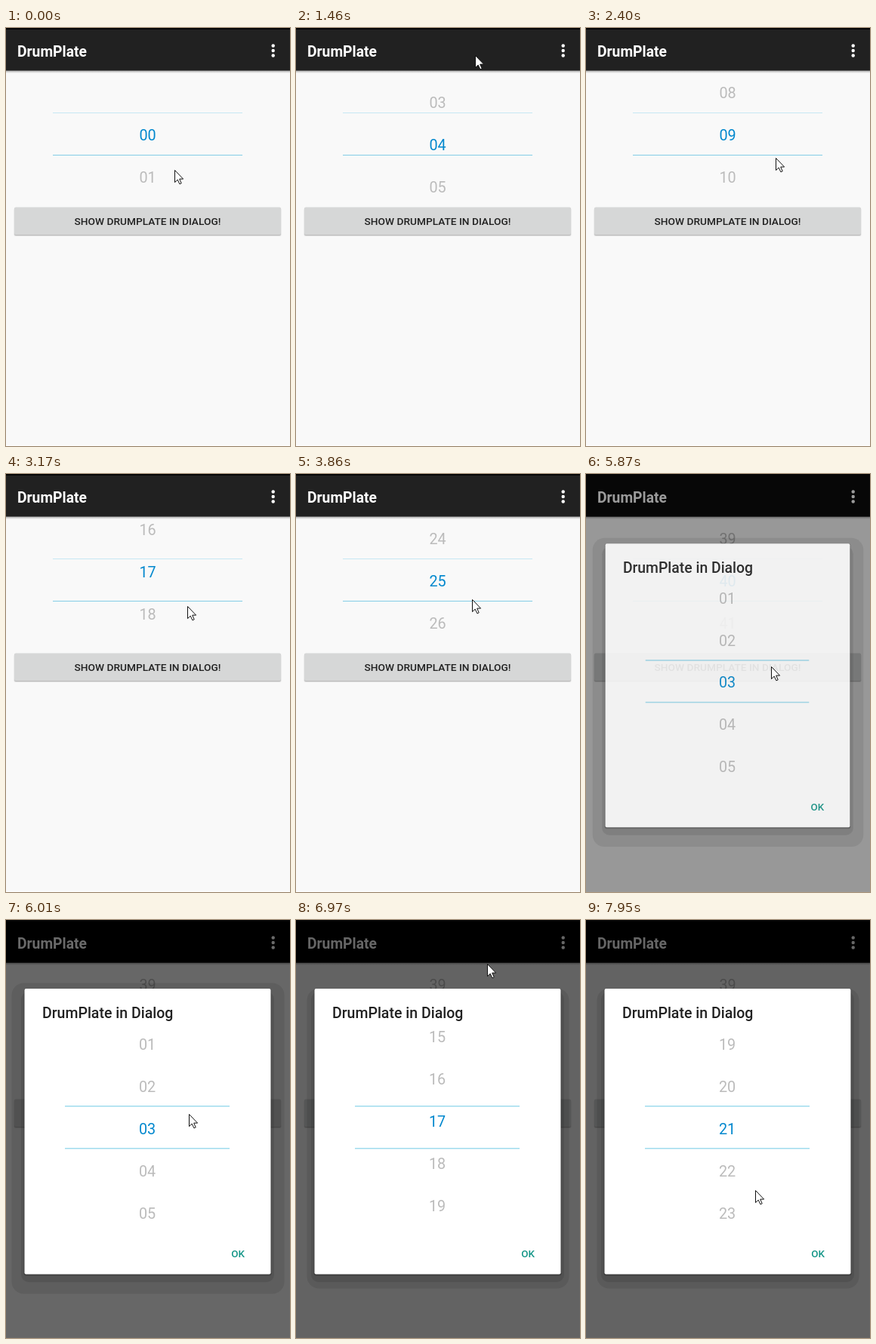
An HTML page that plays this animation: 376 by 554 pixels, repeating every 8 s.

```html
<!DOCTYPE html>
<html lang="en">
<head>
<meta charset="utf-8">
<title>DrumPlate</title>
<style>
  html, body { margin: 0; width: 100%; height: 100%; overflow: hidden; background: #f9f9f9; }
  svg { display: block; width: 376px; height: 554px; font-family: Roboto, sans-serif; }
  .medium { font-weight: 500; }
  .wheel { font-size: 19.8px; text-anchor: middle; }
</style>
</head>
<body>
<svg viewBox="0 0 376 554" xmlns="http://www.w3.org/2000/svg">
  <defs>
    <linearGradient id="drop" x1="0" y1="0" x2="0" y2="1">
      <stop offset="0" stop-opacity=".34"/>
      <stop offset="1" stop-opacity="0"/>
    </linearGradient>
    <clipPath id="pageClip"><rect x="62" y="57" width="251" height="168"/></clipPath>
    <clipPath id="dialogClip"><rect x="78" y="136" width="218" height="278"/></clipPath>
  </defs>

  <rect width="376" height="554" fill="#f9f9f9"/>
  <rect y="553" width="376" height="1" fill="#fff"/>
  <rect y="56" width="376" height="4" fill="url(#drop)"/>
  <rect width="376" height="56.5" fill="#212121"/>
  <rect width="376" height="2" fill="#060606"/>
  <rect id="barDim" y="2" width="376" height="54.5" opacity="0"/>
  <text x="15" y="37.5" font-size="19.3" font-weight="700" fill="#fff">DrumPlate</text>
  <g fill="#fff">
    <circle cx="353.7" cy="23.5" r="2.2"/>
    <circle cx="353.7" cy="30" r="2.2"/>
    <circle cx="353.7" cy="36.5" r="2.2"/>
  </g>

  <rect x="62" y="112" width="251" height="1" fill="#c6e8f3"/>
  <rect x="62" y="168" width="251" height="1" fill="#83cde6"/>
  <g id="pageWheel" class="wheel" clip-path="url(#pageClip)"></g>

  <rect x="10.5" y="238.5" width="354" height="37.5" rx="2.5" opacity=".1"/>
  <rect x="11" y="238" width="353" height="37" rx="2" opacity=".16"/>
  <rect x="11" y="237.5" width="353" height="36.5" rx="2" fill="#d6d7d7"/>
  <text class="medium" x="187.5" y="261" font-size="13.7" text-anchor="middle" fill="#212121">SHOW DRUMPLATE IN DIALOG!</text>

  <rect id="dim" y="2" width="376" height="552" opacity="0"/>
  <g id="dialog" opacity="0">
    <rect id="shade" opacity=".09"/>
    <rect x="20" y="95" width="335" height="385" rx="10" opacity=".1"/>
    <rect x="23.5" y="91" width="328" height="380.5" rx="3" opacity=".22"/>
    <rect x="24.5" y="91" width="326" height="378.5" rx="2" fill="#fff"/>
    <text class="medium" x="48" y="130" font-size="19.5" fill="#212121">DrumPlate in Dialog</text>
    <rect x="78" y="246" width="218" height="1.5" fill="#9fdcee"/>
    <rect x="78" y="302" width="218" height="1.5" fill="#9fdcee"/>
    <g id="dialogWheel" class="wheel" clip-path="url(#dialogClip)"></g>
    <text class="medium" x="298.2" y="447" font-size="13.4" fill="#159688">OK</text>
  </g>

  <path id="cursor" d="M.5 .5V16.6L4.2 13.1L6.9 18.8L9.2 17.8L6.7 12.1H11.6Z"
        fill="#fff" stroke="#111" stroke-linejoin="round"/>
</svg>
<script>
const LOOP = 8000, ROW = 56, OPEN = 5740, READY = 6020;
const RISE = 0.38;  // share of a flick spent dragging upwards
const SWAY = 16;    // how far a drag leans to the right

const $ = id => document.getElementById(id);
const clamp = v => Math.max(0, Math.min(1, v));
const mix = (a, b, u) => a + (b - a) * u;
const smooth = u => (1 - Math.cos(Math.PI * u)) / 2;
const spin = u => 1 - Math.pow(1 - Math.pow(u, 1.6), 4.08);

// Time, wheel value, pointer x and y; a fifth number is the top of a flick that starts here.
const steps = [
  [800, 0, 223, 188], [930, 0, 205, 195],
  [1110, 0, 205, 195, 0], [2400, 9, 251, 172],
  [2440, 9, 251, 172, 0], [3140, 17, 240, 180, 20], [3840, 25, 233, 166],
  [3880, 25, 233, 166, 46], [4400, 32, 240, 185, 33], [4780, 40.125, 340, 150],
  [4960, 40.125, 280, 196], [5140, 40, 258, 241], [5440, 40, 248, 254],
  [OPEN, 40, 248, 254], [READY, 3, 242, 257, 130],
  [6500, 13, 250, 275, 46], [7950, 21, 224, 358]
];

function stateAt(t) {
  const i = Math.max(0, steps.findLastIndex(s => s[0] <= t));
  const [t0, v0, x0, y0, top] = steps[i];
  const [t1, v1, x1, y1] = steps[Math.min(i + 1, steps.length - 1)];
  const u = t1 > t0 ? clamp((t - t0) / (t1 - t0)) : 0;
  const value = mix(v0, v1, spin(u));
  if (top === undefined) return { value, x: mix(x0, x1, smooth(u)), y: mix(y0, y1, smooth(u)) };

  const peak = (x0 + x1) / 2 + SWAY;
  const up = smooth(clamp(u / RISE)), down = smooth(clamp((u - RISE) / (1 - RISE)));
  return {
    value,
    x: mix(mix(x0, peak, up), x1, down),
    y: mix(mix(y0, top, up), y1, down)
  };
}

function makeWheel(id, x, baseline, reach) {
  const rows = Array.from({ length: 2 * reach + 1 }, () => {
    const row = document.createElementNS("http://www.w3.org/2000/svg", "text");
    row.setAttribute("x", x);
    $(id).append(row);
    return row;
  });
  return value => {
    const middle = Math.round(value);
    rows.forEach((row, i) => {
      const n = middle + i - reach;
      row.textContent = n < 0 ? "" : String(n).padStart(2, "0");
      row.setAttribute("y", (baseline + (n - value) * ROW).toFixed(2));
      row.setAttribute("fill", n === middle ? "#0288ce" : "#bbb");
    });
  };
}

const drawPage = makeWheel("pageWheel", 187.5, 149, 2);
const drawDialog = makeWheel("dialogWheel", 187, 283.5, 3);

function setShade(spread) {
  const box = { x: 24 - spread, y: 100 - spread, width: 328 + 2 * spread, height: 379 + 2 * spread, rx: 16 };
  for (const key in box) $("shade").setAttribute(key, box[key]);
}

function draw(t) {
  drawPage(stateAt(Math.min(t, OPEN - 1)).value);
  drawDialog(stateAt(Math.max(t, READY)).value);

  const fade = clamp((t - OPEN) / 150);
  const dim = 1 - Math.pow(1 - clamp((t - OPEN) / 320), 2);
  const grow = 1 - 0.1 * Math.pow(1 - clamp((t - OPEN) / 220), 3);
  $("dim").setAttribute("opacity", 0.6 * dim);
  $("barDim").setAttribute("opacity", dim);
  $("dialog").setAttribute("opacity", fade);
  $("dialog").setAttribute("transform", `translate(187.5 280) scale(${grow}) translate(-187.5 -280)`);
  setShade(t < OPEN + 320 ? 16.5 : 9.5);

  const { x, y } = stateAt(t);
  $("cursor").setAttribute("transform", `translate(${Math.round(x)} ${Math.round(y)})`);
}

const began = performance.now();
function tick() {
  draw((performance.now() - began) % LOOP);
  requestAnimationFrame(tick);
}
draw(0);
requestAnimationFrame(tick);
</script>
</body>
</html>
```
